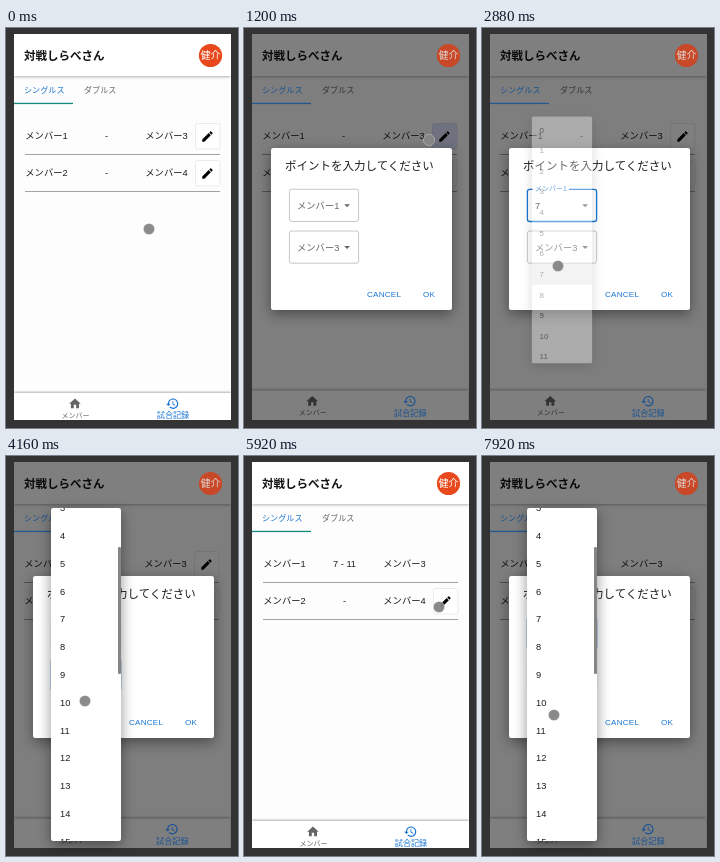
An HTML page that plays this animation: 232 px wide and 400 px high, repeating every 8000 ms.

```html
<!DOCTYPE html>
<html lang="ja">
<head>
<meta charset="utf-8">
<title>対戦しらべさん</title>
<style>
  html, body { margin: 0; width: 100%; height: 100%; overflow: hidden; background: #333; }
  svg { display: block; width: 100%; height: 100%; }
  text { font-family: "Liberation Sans", "Noto Sans CJK JP", "Noto Sans CJK", sans-serif; font-size: 9.3px; fill: #1c1c1c; white-space: pre; }
  .title { font-size: 11.5px; font-weight: 700; fill: #111; }
  .head { font-size: 11.5px; }
  .small { font-size: 8.1px; }
  .mid { text-anchor: middle; }
  .gray { fill: #666; }
  .accent { fill: #1976d2; }
  .bar { filter: drop-shadow(0 1px 1.5px rgba(0, 0, 0, .3)); }
  .raised { filter: drop-shadow(0 4px 7px rgba(0, 0, 0, .42)); }
</style>
</head>
<body>
<svg viewBox="0 0 232 400" preserveAspectRatio="none">
  <defs>
    <clipPath id="pageClip"><rect x="8" y="6" width="217" height="386"/></clipPath>
    <clipPath id="menuClip"><rect x="45" y="52" width="70" height="333" rx="2.3"/></clipPath>
    <path id="pencil" d="M3 17.25V21h3.75L17.81 9.94l-3.75-3.75L3 17.25zM20.71 7.04c.39-.39.39-1.02 0-1.41l-2.34-2.34c-.39-.39-1.02-.39-1.41 0l-1.83 1.83 3.75 3.75 1.83-1.83z"/>
  </defs>
  <rect width="232" height="400" fill="#333"/>
  <g clip-path="url(#pageClip)">
    <rect x="8" y="6" width="217" height="386" fill="#fdfdfd"/>
    <rect class="bar" x="8" y="0" width="217" height="48" fill="#fff"/>
    <text class="title" x="18" y="31.5">対戦しらべさん</text>
    <text class="small gray" x="78" y="65">ダブルス</text>
    <g id="rows"></g>
    <g class="nav">
      <rect x="8" y="365" width="217" height="32" fill="#fff" style="filter:drop-shadow(0 -.5px 1px rgba(0,0,0,.3))"/>
      <path class="gray" transform="translate(62 368.7) scale(.58)" d="M10 20v-6h4v6h5v-8h3L12 3 2 12h3v8z"/>
      <text class="gray mid" x="69.5" y="389.7" style="font-size:7px">メンバー</text>
    </g>
    <rect id="shade" x="8" y="6" width="217" height="386"/>
    <g id="bright">
      <text class="small accent" x="18" y="65">シングルス</text>
      <rect id="tabLine" x="8" y="74.8" width="59" height="1.3"/>
      <circle id="avatar" cx="204.5" cy="27.5" r="11.6"/>
      <text id="initials" class="mid" x="204.5" y="31.2" style="font-size:10px">健介</text>
      <g class="nav accent">
        <path transform="translate(159.5 368.7) scale(.58)" d="M13 3c-4.97 0-9 4.03-9 9H1l3.89 3.89.07.14L9 12H6c0-3.87 3.13-7 7-7s7 3.13 7 7-3.13 7-7 7c-1.93 0-3.68-.79-4.94-2.06l-1.42 1.42C8.27 19.99 10.51 21 13 21c4.97 0 9-4.03 9-9s-4.03-9-9-9zm-1 5v5l4.28 2.54.72-1.21-3.5-2.08V8H12z"/>
        <text class="small accent mid" x="167" y="390">試合記録</text>
      </g>
    </g>
  </g>
  <g id="dialog">
    <rect class="raised" x="27" y="120" width="181" height="162" rx="2.3" fill="#fff"/>
    <text class="head" x="41" y="141.6">ポイントを入力してください</text>
    <g id="fields"></g>
    <text class="small accent" x="123" y="269.4" letter-spacing=".23">CANCEL</text>
    <text class="small accent" x="179" y="269.4" letter-spacing=".23">OK</text>
  </g>
  <g id="menu">
    <rect class="raised" x="45" y="52" width="70" height="333" rx="2.3" fill="#fff"/>
    <g clip-path="url(#menuClip)">
      <g id="items"></g>
      <rect id="thumb" x="112" width="3" height="127" rx="1.2" fill="#858585"/>
    </g>
  </g>
  <circle id="cursor" r="5.6" fill="#858585" fill-opacity=".96" stroke="#fff" stroke-opacity=".4" stroke-width=".8"/>
</svg>
<script>
const LOOP = 8000, STEP = 80;
const ITEM = 27.8, MENU_TOP = 52, MENU_H = 333, PAD = 4.6, COUNT = 31;
const CONTENT_H = COUNT * ITEM + 2 * PAD;

const CURSOR = [
  [0, 143, 201], [160, 147, 196], [480, 184, 130], [720, 199, 110], [1040, 198, 110],
  [1200, 185, 112], [1440, 105, 164], [1600, 80, 179], [1880, 80, 179],
  [2320, 77, 251], [2560, 76, 265], [2720, 76, 265], [2880, 76, 238], [3120, 77, 220],
  [3440, 77, 220], [3680, 79, 245], [4160, 79, 245], [4400, 76, 273], [4560, 80, 273],
  [4880, 165, 266], [5040, 184, 264], [5120, 185, 264], [5440, 185, 264],
  [5760, 191, 172], [5920, 195, 151], [6160, 201, 146], [6320, 201, 146],
  [6560, 107, 178], [6720, 83, 188], [7120, 83, 188], [7520, 72, 259]
];
const DIM = [[1000, 0], [1200, 1], [5320, 1], [5560, 0], [6280, 0], [6480, 1]];
const MENU = [
  [1800, 0], [1980, 1], [2680, 1], [3040, 0], [3320, 0], [3500, 1],
  [4440, 1], [4800, 0], [7000, 0], [7040, .85], [7120, .85], [7200, 1]
];
const SCROLL = [
  [3680, 0], [3840, 34], [4000, 82], [4160, 102], [5000, 102], [5001, 0],
  [7680, 0], [7760, 40], [7840, 84], [7920, 102]
];

const $ = id => document.getElementById(id);
const set = (el, attrs) => { for (const k in attrs) el.setAttribute(k, attrs[k]); };
const within = (t, a, b) => t >= a && t < b;

// Linear interpolation through [time, value] keys.
function track(keys, t, col = 1) {
  const i = keys.findIndex(k => k[0] > t);
  if (i === 0) return keys[0][col];
  if (i < 0) return keys[keys.length - 1][col];
  const a = keys[i - 1], b = keys[i];
  return a[col] + (b[col] - a[col]) * (t - a[0]) / (b[0] - a[0]);
}

function mix(from, to, p) {
  return `rgb(${from.map((c, i) => Math.round(c + (to[i] - c) * p))})`;
}

function row(y, left, right, score, editable, tint) {
  const button = `<rect x="189.5" y="${y - 12.5}" width="24.5" height="25.5" rx="2.3"
      fill="${tint ? '#e0e4ff' : '#fff'}" stroke="${tint ? '#d0d4ee' : '#e2e2e2'}" stroke-width=".7"/>
    <use href="#pencil" transform="translate(194.5 ${y - 6.5}) scale(.58)"/>`;
  return `<text x="19.3" y="${y + 3.4}">メンバー${left}</text>
    <text class="mid" x="100.5" y="${y + 3.4}">${score}</text>
    <text x="139.3" y="${y + 3.4}">メンバー${right}</text>
    <rect x="19" y="${y + 18.2}" width="195" height=".8" fill="#8c8c8c"/>${editable ? button : ''}`;
}

function field(y, member, value, active) {
  const raised = active || value !== '';
  const line = active ? '#1976d2' : '#b9b9b9';
  const label = raised
    ? `<rect x="51" y="${y - 1.5}" width="36" height="3" fill="#fff"/>
       <text x="53" y="${y + 2}" style="font-size:7px;fill:${active ? '#1976d2' : '#666'}">メンバー${member}</text>`
    : `<text class="gray" x="53" y="${y + 19.6}">メンバー${member}</text>`;
  return `<rect x="45.4" y="${y}" width="69.2" height="32.2" rx="2.3" fill="none"
      stroke="${line}" stroke-width="${active ? 1.3 : .8}"/>${label}
    <text x="53" y="${y + 19.6}">${value}</text>
    <path class="gray" d="M100.2 ${y + 15}h5.8l-2.9 2.9z"/>`;
}

const items = Array.from({ length: COUNT }, (_, n) => {
  const y = MENU_TOP + PAD + n * ITEM;
  return `<rect x="45" y="${y}" width="70" height="${ITEM}" fill="none"/>
    <text x="54" y="${y + ITEM / 2 + 3.3}">${n}</text>`;
});
$('items').innerHTML = items.join('');
const strips = $('items').querySelectorAll('rect');

function drawPage(t, dim) {
  const done = t >= 5400;
  const open = dim > 0;
  $('rows').innerHTML =
    row(108, 1, 3, done ? '7 - 11' : '-', !done, within(t, 1040, 1840)) +
    row(145, 2, 4, '-', true, within(t, 6320, 7040));
  set($('rows'), { transform: `translate(${open ? -1 : 0} 0)` });
  for (const nav of document.querySelectorAll('.nav'))
    set(nav, { transform: open ? 'translate(-.7 -2.5)' : '' });

  set($('shade'), { opacity: dim * .5 });
  const blue = mix([25, 118, 210], [24, 82, 146], dim);
  for (const el of $('bright').querySelectorAll('.accent')) el.style.fill = blue;
  set($('tabLine'), { fill: mix([18, 138, 128], [34, 88, 146], dim) });
  set($('avatar'), { fill: mix([232, 72, 28], [200, 72, 40], dim) });
  $('initials').style.fill = mix([255, 255, 255], [222, 214, 210], dim);
}

function drawDialog(t, dim) {
  const second = t >= 6000;
  const first = !second && t >= 2680 ? '7' : '';
  const last = !second && t >= 4440 ? '11' : '';
  $('fields').innerHTML =
    field(161.3, second ? 2 : 1, first, within(t, 1840, 3360) || t >= 7040) +
    field(203, second ? 4 : 3, last, within(t, 3360, 6000));
  set($('dialog'), { opacity: dim });
}

function drawMenu(t) {
  const m = track(MENU, t);
  const scroll = track(SCROLL, t);
  const sx = .75 + .25 * m;
  const y = within(t, 3300, 5000) ? 219 : 193;
  set($('menu'), {
    opacity: m ** 1.3,
    visibility: m ? 'visible' : 'hidden',
    transform: `translate(80 ${y}) scale(${sx} ${sx * sx}) translate(-80 ${-y})`
  });
  set($('items'), { transform: `translate(0 ${-scroll})` });
  set($('thumb'), { y: MENU_TOP + scroll / CONTENT_H * MENU_H, opacity: scroll ? 1 : 0 });
  const picked = within(t, 2640, 3200) ? 7 : within(t, 4400, 5000) ? 11 : -1;
  strips.forEach((el, n) => set(el, { fill: n === picked ? 'rgba(0,0,0,.13)' : 'none' }));
}

function draw(t) {
  const dim = track(DIM, t);
  drawPage(t, dim);
  drawDialog(t, dim);
  drawMenu(t);
  set($('cursor'), { cx: track(CURSOR, t), cy: track(CURSOR, t, 2) });
}

const start = performance.now();
let shown = -1;
function tick() {
  const t = Math.floor((performance.now() - start) % LOOP / STEP) * STEP;
  if (t !== shown) draw(shown = t);
  requestAnimationFrame(tick);
}
tick();
</script>
</body>
</html>
```
